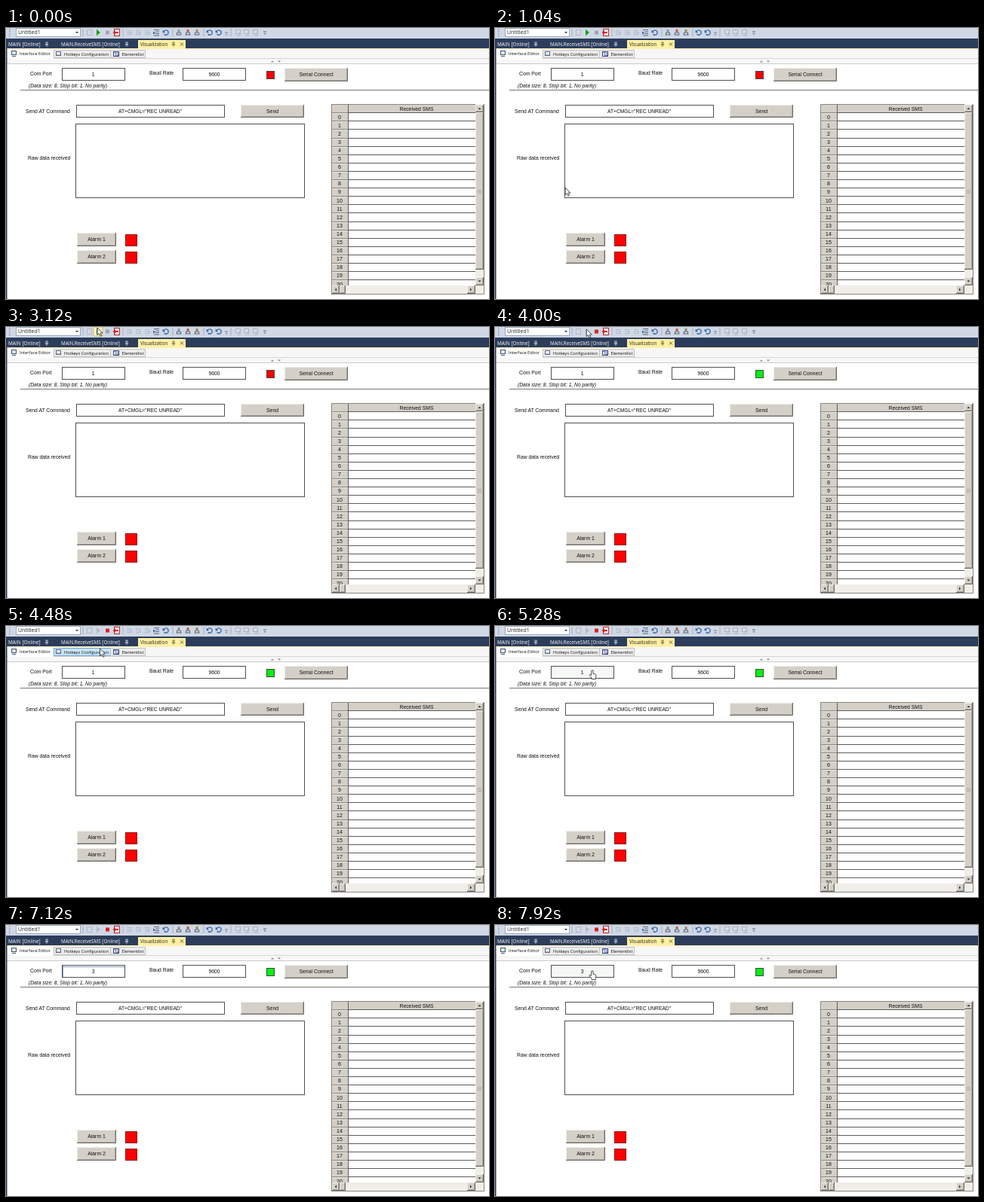
An HTML page for the animation above (8 s loop, 640 by 360 pixels).

```html
<!DOCTYPE html>
<html lang="en">
<head>
<meta charset="utf-8">
<title>Serial SMS panel</title>
<style>
html, body { margin: 0; width: 100%; height: 100%; overflow: hidden; background: #fff; }
svg { display: block; width: 100vw; height: 100vh; }
text { font-family: "Liberation Sans", Arial, sans-serif; font-size: 6.8px; fill: #111; white-space: pre; }
.ui { font-family: "Open Sans", "Noto Sans", sans-serif; }
</style>
</head>
<body>
<svg id="stage" viewBox="0 0 640 360"></svg>
<script>
const LOOP = 8000, STEP = 80;
const EDGE = '#505050';
const stage = document.getElementById('stage');
const parts = [];
const add = s => parts.push(s);

const rect = (x, y, w, h, fill, extra = '') =>
  add(`<rect x="${x}" y="${y}" width="${w}" height="${h}" fill="${fill}" ${extra}/>`);
const box = (x, y, w, h, fill, stroke, extra = '') =>
  rect(x + .5, y + .5, w - 1, h - 1, fill, `stroke="${stroke}" ${extra}`);
const path = (d, fill, stroke = 'none', extra = '') =>
  add(`<path d="${d}" fill="${fill}" stroke="${stroke}" ${extra}/>`);
const text = (x, y, s, extra = '') => add(`<text x="${x}" y="${y}" ${extra}>${s}</text>`);
const mid = (x, y, s, extra = '') => text(x, y, s, 'text-anchor="middle" ' + extra);
const ui = (x, y, s, size, fill) =>
  text(x, y, s, `class="ui" style="font-size:${size}px;fill:${fill}"`);

function button(x, y, w, h, label) {
  rect(x, y, w, h, '#d4d0c8');
  path(`M${x + .5} ${y + h}V${y + .5}H${x + w}`, 'none', '#efede8');
  path(`M${x} ${y + h - .5}H${x + w - .5}V${y}`, 'none', '#6b6964');
  path(`M${x + 1} ${y + h - 1.5}H${x + w - 1.5}V${y + 1}`, 'none', '#aeaaa2');
  if (label) mid(x + w / 2, y + h / 2 + 2.4, label, 'style="font-size:6.9px"');
}

// Triangle pointing up, down, left or right
function tri(x, y, dir, r = 2, fill = '#222') {
  const turn = { up: 0, right: 90, down: 180, left: 270 }[dir];
  path(`M${-r} ${r / 2}L0 ${-r / 2}L${r} ${r / 2}z`, fill, 'none',
    `transform="translate(${x} ${y}) rotate(${turn})"`);
}

const sep = x => path(`M${x} 1V11`, 'none', '#a3aec1');

function refresh(x) {
  path(`M${x - 3} 4.8A3.2 3.2 0 1 1 ${x - 2.4} 8.2`, 'none', '#2d62a8', 'stroke-width="1.3"');
  path(`M${x - 4.4} 2.6v3.6h3.4z`, '#2d62a8');
}

function toolbar() {
  rect(0, 0, 640, 15, '#d0d8e5');
  for (let i = 0; i < 4; i++) rect(4, 1 + i * 3, 1.5, 1.5, '#8f9bb0');
  box(13, 0, 86, 12, '#fff', '#9aa8bf');
  ui(16, 8.3, 'Untitled1', 6.9, '#222');
  tri(94, 6, 'down', 2);
  sep(102);
  box(107, 2, 7, 8, '#d3d8e2', '#b0b9c8');
  rect(116, 0, 12, 12, '#fdf0bd', 'id="glow" stroke="#dfc069"');
  path('M120 1.8L125 6L120 10.2z', '#16a018', 'none', 'id="play"');
  rect(132, 3.5, 5, 5, '#9da5b3', 'id="stop"');
  box(143, 1, 8, 10, '#fff', '#b3252a');
  path('M141.5 6l3.5-3v2h4v2h-4v2z', '#d8232a');
  sep(155);
  for (const x of [160, 172, 184]) {
    path(`M${x} 3.5h6M${x} 6h4M${x} 8.5h6`, 'none', '#a7b0c0', 'stroke-width=".8"');
    path(`M${x + 5} 4.5v4l2-2z`, '#a7b0c0');
  }
  path('M196 2.5h7M198 5h5M198 7.5h5M196 10h7', 'none', '#4c5a76', 'stroke-width=".9"');
  path('M195 4.5l3 2-3 2z', '#2d62a8');
  refresh(212);
  sep(221);
  [229, 241, 253].forEach((x, i) => {
    path(`M${x - 3.5} 9h7M${x - 2.5} 9V6h5v3M${x} 6V2.5`, 'none', '#596275');
    rect(x - 1.5, 2, 3, 3, ['#8a95a9', '#bd5a42', '#9d8a52'][i]);
  });
  sep(262);
  refresh(270);
  refresh(282);
  path('M290 6h4', 'none', '#6d7990');
  tri(292, 9, 'down', 1.7, '#6d7990');
  sep(298);
  for (const x of [304, 315, 327]) {
    box(x, 2, 7, 6, '#d7dce5', '#a9b2c1');
    path(`M${x + 2} 10h5M${x + 6} 5v4`, 'none', '#a9b2c1');
  }
  path('M341 5h4', 'none', '#53607a');
  tri(343, 8, 'down', 1.7, '#53607a');
}

const pin = (x, color) =>
  path(`M${x - 1.5} 19h3M${x - 1} 19v3h2v-3M${x - 2.3} 22.3h4.6M${x} 22.5v2.5`, 'none', color, 'stroke-width=".8"');

function tabs() {
  rect(0, 14, 640, 13, '#2c3d5b');
  ui(3, 24.2, 'MAIN [Online]', 6.5, '#fff');
  pin(54, '#d3dbe8');
  ui(73, 24.2, 'MAIN.ReceiveSMS [Online]', 6.3, '#fff');
  pin(160, '#d3dbe8');
  rect(175, 16, 63, 11, '#fff0a4');
  ui(178, 24.2, 'Visualization', 6.2, '#222');
  pin(222, '#6f6033');
  path('M231 19.5l4 4m0-4l-4 4', 'none', '#6f6033');
  rect(0, 27, 640, 1, '#fff0b4');

  rect(0, 28, 640, 20, '#f7f7f7');
  path('M0 40.5H640', 'none', '#d6d6d6');
  box(63, 29, 76, 11, '#ececec', '#c2c2c2', 'id="hotTab"');
  box(138, 29, 47, 11, '#ececec', '#c2c2c2');
  rect(2, 28, 61, 13, '#fff');
  box(7, 30, 7, 6, '#dce7f4', '#43536d');
  path('M8 37.5h5', 'none', '#43536d');
  box(66, 31, 7, 6, '#fff', '#53637c');
  path('M67 35h5', 'none', '#9aa5b8');
  box(142, 31, 8, 7, '#fff', '#2e3f73');
  path('M142 32h8M145 32v6M146 34.5h3M146 36.5h3', 'none', '#3c4c9a', 'stroke-width=".8"');
  ui(18, 36, 'Interface Editor', 5.7, '#111');
  ui(77, 36.6, 'Hotkeys Configuration', 5.7, '#111');
  ui(153.5, 36.6, 'Elementlist', 5.6, '#111');
  tri(353, 44.5, 'up', 2.2, '#888');
  tri(362, 44.5, 'down', 2.2, '#888');
  path('M0 47.5H640', 'none', '#cacaca');
}

function form() {
  text(32, 63, 'Com Port');
  box(74, 53, 84, 17, '#fff', EDGE, 'id="port"');
  path('M75 55.5H157M75.5 54V69', 'none', '#7e9dbf', 'id="portEdge"');
  rect(112.7, 57, 5.6, 11, '#2f7fd6', 'id="sel"');
  mid(115.6, 64, '1', 'id="portText"');
  text(190, 62, 'Baud Rate');
  box(234, 53, 84, 17, '#fff', EDGE);
  mid(276, 64, '9600');
  box(345, 57, 11, 11, '#f00', '#444', 'id="lamp"');
  button(369, 53, 84, 18, 'Serial Connect');
  text(30, 79, '(Data size: 8, Stop bit: 1, No parity)', 'font-style="italic" style="font-size:6.7px"');
  path('M19 82.5H640', 'none', '#777');

  text(26, 113, 'Send AT Command');
  box(93, 102, 197, 17, '#fff', EDGE);
  mid(191, 112.8, 'AT+CMGL="REC UNREAD"', 'style="font-size:6.7px"');
  button(311, 102, 84, 17, 'Send');
  text(29, 174.5, 'Raw data received');
  box(92, 127, 304, 99, '#fff', EDGE);

  [272, 295].forEach((y, i) => {
    button(94, y, 52, 18, 'Alarm ' + (i + 1));
    box(158, y + 2, 16, 16, '#f00', '#8c1010');
  });
}

function table() {
  const top = 112.2, pitch = 11.1;
  add('<clipPath id="rows"><rect x="431" y="101" width="191" height="241"/></clipPath>');
  rect(431, 101, 203, 253, '#d4d0c8');
  rect(453, top, 169, 230, '#fff');
  add('<g clip-path="url(#rows)">');
  for (let i = 0; i < 21; i++) {
    const y = top + i * pitch, line = Math.round(y) + .5;
    path(`M431 ${line}H453`, 'none', '#8b8882');
    path(`M431 ${line + 1}H453`, 'none', '#e6e3dd');
    path(`M453 ${line}H622`, 'none', '#5c5c5c');
    mid(442, y + 8.3, i, 'style="font-size:7px"');
  }
  add('</g>');
  path('M453.5 101V342', 'none', '#5c5c5c');
  mid(544, 109.8, 'Received SMS');
  path('M431.5 354V101.5H634', 'none', '#8b8882');

  rect(622, 101, 11, 241, '#f0eee9');
  button(622, 102, 11, 10);
  tri(627.5, 107, 'up');
  button(622, 112, 11, 209);
  path('M625 215.5h5M625 217.5h5M625 219.5h5', 'none', '#a5a199', 'stroke-width=".8"');
  button(622, 331, 11, 11);
  tri(627.5, 336.5, 'down');

  rect(432, 342, 201, 11, '#f0eee9');
  button(432, 342, 10, 11);
  tri(437, 347.5, 'left');
  button(442, 342, 8, 11);
  button(611, 342, 11, 11);
  tri(616, 347.5, 'right');
  path('M431 353.5H633.5V101', 'none', '#8b8882');
}

toolbar();
tabs();
form();
table();
rect(0, 15, 1.5, 345, '#2c3d5b');
path('M0 0V9.6L2.3 7.6L4 11.2L5.6 10.4L4 7H7z', '#fff', '#222', 'id="arrow" stroke-width=".8"');
path('M-1.3 6.3V1Q-1.2-.2 0-.2T1.1 1V4.3L4 5Q5.2 5.4 5 6.7L4.4 9.6V11.6H-.9V10L-3.8 6.6Q-4.1 5.3-2.8 5.4z',
  '#fff', '#222', 'id="hand" stroke-width=".8"');
stage.innerHTML = parts.join('');

const el = id => document.getElementById(id);
const show = (id, on) => el(id).setAttribute('visibility', on ? 'visible' : 'hidden');
const paint = (id, fill) => el(id).setAttribute('fill', fill);

// Pointer path: time, x, y
const track = [
  [800, 57, 324], [1040, 93, 212], [1360, 112, 196], [1600, 113, 168],
  [1920, 131, 92], [2240, 136, 57], [2400, 136, 57], [2720, 133, 30],
  [3040, 121, 1], [3920, 121, 1], [4400, 124, 29], [4480, 124.5, 30],
  [4960, 129, 59], [7360, 129, 59], [7600, 128.5, 61], [8000, 129, 61]
];

function pointer(t) {
  const i = Math.max(1, track.findIndex(k => k[0] >= t));
  const [t0, x0, y0] = track[i - 1], [t1, x1, y1] = track[i];
  const p = Math.max(0, (t - t0) / (t1 - t0)), e = p * p * (3 - 2 * p);
  return [x0 + (x1 - x0) * e, y0 + (y1 - y0) * e];
}

function draw(t) {
  const [x, y] = pointer(t);
  const running = t >= 3360, online = t >= 3760;
  const editing = t >= 5600 && t < 7200, typed = t >= 6800;
  const visible = t >= 800 && !(t >= 5760 && t < 7360);
  const inside = (l, top, r, b) => visible && x >= l && x < r && y >= top && y < b;
  const overPort = inside(74, 53, 158, 71);
  const overTab = inside(63, 28, 139, 41);

  show('arrow', visible && !overPort);
  show('hand', overPort);
  for (const id of ['arrow', 'hand']) el(id).setAttribute('transform', `translate(${x} ${y})`);

  show('glow', !running && inside(116, 0, 128, 13));
  paint('play', running ? '#b3bbc8' : '#16a018');
  paint('stop', running ? '#d8232a' : '#9da5b3');
  paint('lamp', online ? '#00f010' : '#f00');
  paint('hotTab', overTab ? '#c9e3f8' : '#ececec');
  el('hotTab').setAttribute('stroke', overTab ? '#6fa9d8' : '#c2c2c2');

  paint('port', overPort && !editing ? '#f6f8f6' : '#fff');
  show('portEdge', editing);
  show('sel', editing && !typed);
  el('portText').textContent = typed ? '3' : '1';
  el('portText').style.fill = editing && !typed ? '#fff' : '#111';
}

const start = performance.now();
function tick() {
  const t = (performance.now() - start) % LOOP;
  draw(Math.floor(t / STEP) * STEP);
  requestAnimationFrame(tick);
}
tick();
</script>
</body>
</html>
```
